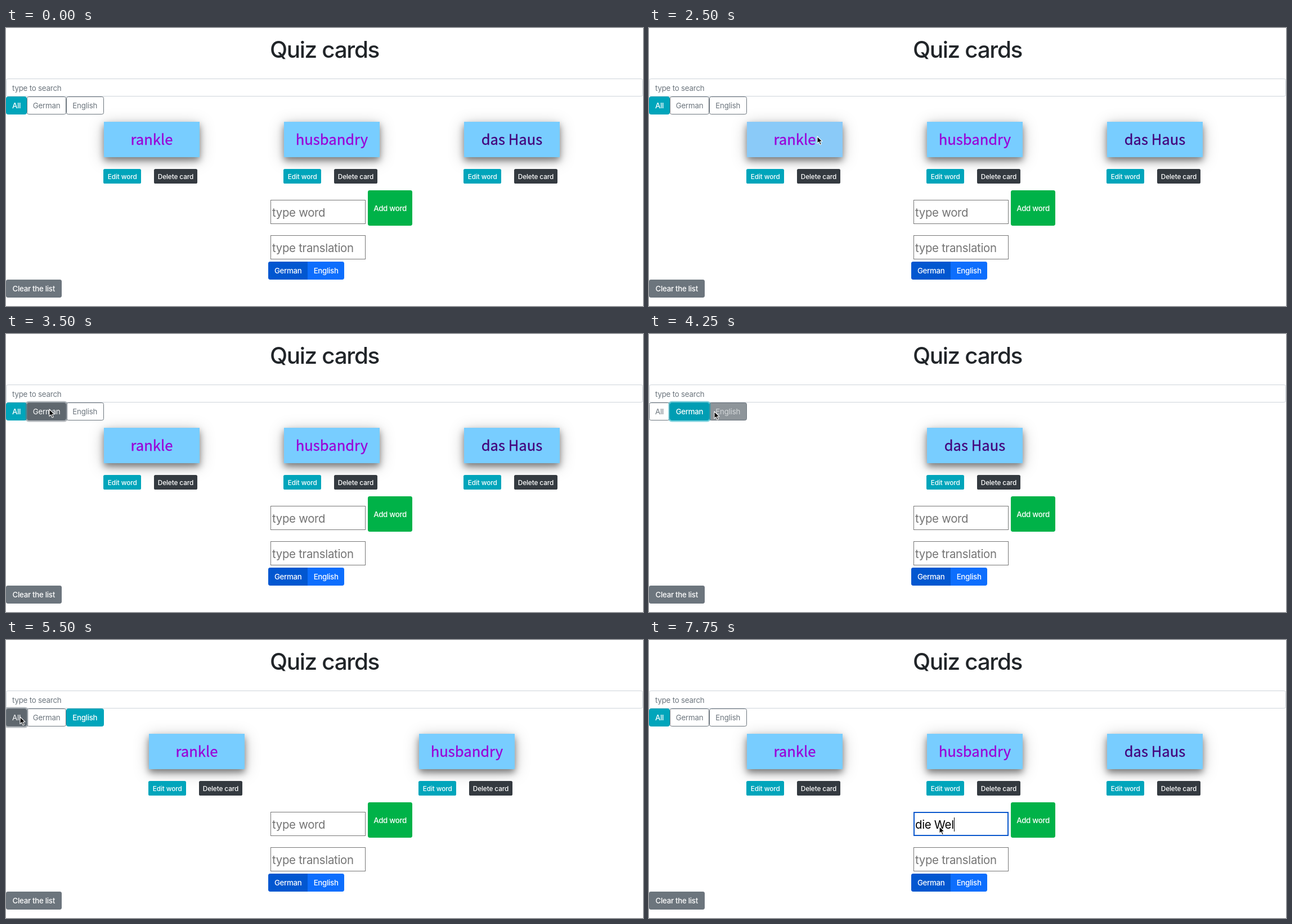
Animation, 1132 px wide and 495 px high, one loop 8000 ms. Source, as an HTML page:

```html
<!DOCTYPE html>
<html lang="en">
<head>
<meta charset="utf-8">
<title>Quiz cards</title>
<style>
html, body { margin: 0; width: 100%; height: 100%; overflow: hidden; background: #fff; }
#stage { position: relative; width: 1132px; height: 495px; overflow: hidden; font: 13.3px/1 Inter, Roboto, sans-serif; letter-spacing: -.2px; color: #fff; }
#stage div { position: absolute; box-sizing: border-box; white-space: pre; }
#title { left: 0; top: 14px; width: 1132px; text-align: center; font-size: 40.5px; font-weight: 550; line-height: 49px; letter-spacing: -1.35px; color: #212529; }
.btn { border-radius: 3.4px; text-align: center; line-height: 32px; height: 32px; font-weight: 500; letter-spacing: -.3px; }
.tab { top: 122px; border: 1px solid #6c757d; line-height: 31px; color: #6c757d; font-weight: 400; letter-spacing: -.2px; }
.tab.hover { background: #6c757d; color: #fff; font-weight: 500; letter-spacing: -.3px; }
.tab.half { background: #8e959a; color: #d5d8da; }
.tab.press { background: #5f676e; color: #fff; box-shadow: 0 0 0 2.6px rgba(108,117,125,.5); z-index: 1; }
.tab.on { background: #00a5bb; border-color: #00a5bb; color: #fff; font-weight: 500; letter-spacing: -.3px; }
.tab.ring { box-shadow: 0 0 0 2.6px rgba(0,165,187,.5); background: #009db3; z-index: 1; }
.card { top: 0; width: 170px; height: 280px; }
.face { left: .3px; top: 167px; width: 169.3px; height: 63px; text-align: center; line-height: 60px; font-family: "Noto Sans CJK JP", "Noto Sans", sans-serif; font-size: 25.6px; letter-spacing: 0; -webkit-text-stroke: .3px; color: #9a00d7; background: #78cdff; box-shadow: 0 6px 11px rgba(0,0,0,.42), 0 5px 28px rgba(0,0,0,.26); }
.face.ru { font-family: "Noto Sans", sans-serif; font-weight: 500; line-height: 62px; -webkit-text-stroke: 0; }
.small { top: 251px; height: 26px; line-height: 28px; font-size: 11.8px; letter-spacing: -.1px; border-radius: 2.6px; }
.field { left: 470px; width: 168.5px; height: 42.5px; border: 1px solid #767676; padding-left: 2px; line-height: 43px; font-size: 20.4px; letter-spacing: -.3px; color: #757575; }
.field.hover { border-color: #4f4f4f; }
.field.focus { border: 2px solid #0a57cc; padding-left: 1px; line-height: 41px; color: #000; }
#caret { display: inline-block; width: 1px; height: 25px; background: #000; vertical-align: middle; margin-top: -3px; }
#cursor { position: absolute; z-index: 5; }
</style>
</head>
<body>
<div id="stage">
  <div id="title">Quiz cards</div>
  <div style="left:0;top:90px;width:1132px;height:32px;border:1px solid #ced4da;border-radius:3.4px;padding-left:10px;line-height:32px;color:#6c757d">type to search</div>
  <div class="btn tab" style="left:0;width:37px">All</div>
  <div class="btn tab" style="left:37px;width:70px">German</div>
  <div class="btn tab" style="left:107px;width:66.5px">English</div>
  <div id="cards"></div>
  <div class="field" id="word" style="top:306px"></div>
  <div class="btn" style="left:642.7px;top:289.3px;width:79.8px;height:63px;line-height:64px;background:#00b248">Add word</div>
  <div class="field" style="top:369.3px">type translation</div>
  <div class="btn" style="left:465.7px;top:415.7px;width:71px;background:#0257d0;border-radius:3.4px 0 0 3.4px">German</div>
  <div class="btn" style="left:536px;top:415.7px;width:65.3px;background:#0d6efd;border-radius:0 3.4px 3.4px 0">English</div>
  <div class="btn" style="left:0;top:447.8px;width:98.5px;background:#6c757d">Clear the list</div>
  <svg id="cursor" width="14" height="20" viewBox="-2 -2 14 20"><path d="M0 0V12.4L2.9 9.8 5 14.8 7.2 13.9 5.1 9 9 8.8Z" stroke="#fff" stroke-width="1.1" stroke-linejoin="round"/></svg>
</div>
<script>
const $ = id => document.getElementById(id);
const tabs = [...document.querySelectorAll('.tab')];
const cards = ['rankle', 'husbandry', 'das Haus'].map((text, i) => {
  const el = document.createElement('div');
  el.className = 'card';
  el.innerHTML = `<div class="face"${i === 2 ? ' style="color:#43007b"' : ''}>${text}</div>
    <div class="btn small" style="left:-.6px;width:66.6px;background:#00a5bb">Edit word</div>
    <div class="btn small" style="left:88.8px;width:77.4px;background:#343a40">Delete card</div>`;
  $('cards').append(el);
  return el;
});
const face = cards[0].firstChild;

// card positions per filter: all, German, English
const layouts = [[174, 494, 814], [null, null, 494], [254, 734, null]];

// each step changes only the listed properties at its time
const start = { at: null, filter: 0, ring: false, over: -1, mode: 'hover', flip: false, tint: 0, field: '', typed: '' };
const steps = [
  [250, { at: [443, 202] }],
  [500, { at: [372, 198] }],
  [750, { at: [308, 194] }],
  [1000, { at: [299, 193] }],
  [1750, { flip: true, tint: .81 }],
  [2000, { tint: .97 }],
  [2250, { tint: 1 }],
  [2500, { flip: false, tint: .19 }],
  [2750, { tint: 0 }],
  [3000, { at: [136, 156] }],
  [3250, { at: [77, 134], over: 1 }],
  [3500, { mode: 'press' }],
  [3750, { filter: 1, ring: true, over: -1 }],
  [4250, { at: [116, 138], over: 2, mode: 'half' }],
  [4500, { at: [132, 140], mode: 'hover' }],
  [4750, { filter: 2, over: -1 }],
  [5000, { at: [76, 139], over: 1 }],
  [5250, { at: [25, 137], over: 0 }],
  [5500, { mode: 'press', ring: false }],
  [5750, { filter: 0, ring: true, over: -1 }],
  [6000, { at: [398, 276] }],
  [6250, { at: [516, 332], field: 'hover' }],
  [6750, { field: 'focus', ring: false }],
  [7000, { typed: 'd' }],
  [7250, { typed: 'die' }],
  [7500, { typed: 'die W' }],
  [7750, { typed: 'die Wel' }]
];

const mix = (a, b, k) => `rgb(${a.map((v, i) => Math.round(v + (b[i] - v) * k))})`;

function draw(s) {
  tabs.forEach((tab, i) => {
    const on = i === s.filter;
    tab.className = 'btn tab' + (on ? ' on' : '') + (on && s.ring ? ' ring' : '') + (i === s.over ? ' ' + s.mode : '');
  });
  cards.forEach((card, i) => {
    const x = layouts[s.filter][i];
    card.style.display = x === null ? 'none' : '';
    card.style.left = x + 'px';
  });
  face.textContent = s.flip ? 'терзать' : 'rankle';
  face.classList.toggle('ru', s.flip);
  face.style.background = mix([120, 205, 255], [216, 191, 216], s.tint);
  $('word').className = 'field ' + s.field;
  $('word').innerHTML = s.field === 'focus' ? s.typed + '<span id="caret"></span>' : 'type word';
  $('cursor').style.display = s.at ? '' : 'none';
  if (s.at) {
    $('cursor').style.left = s.at[0] - 2 + 'px';
    $('cursor').style.top = s.at[1] - 2 + 'px';
  }
}

let shown = -1;
function tick() {
  const t = performance.now() % 8000;
  const past = steps.filter(([time]) => time <= t);
  if (past.length !== shown) {
    shown = past.length;
    draw(Object.assign({}, start, ...past.map(([, change]) => change)));
  }
  requestAnimationFrame(tick);
}
tick();
</script>
</body>
</html>
```
